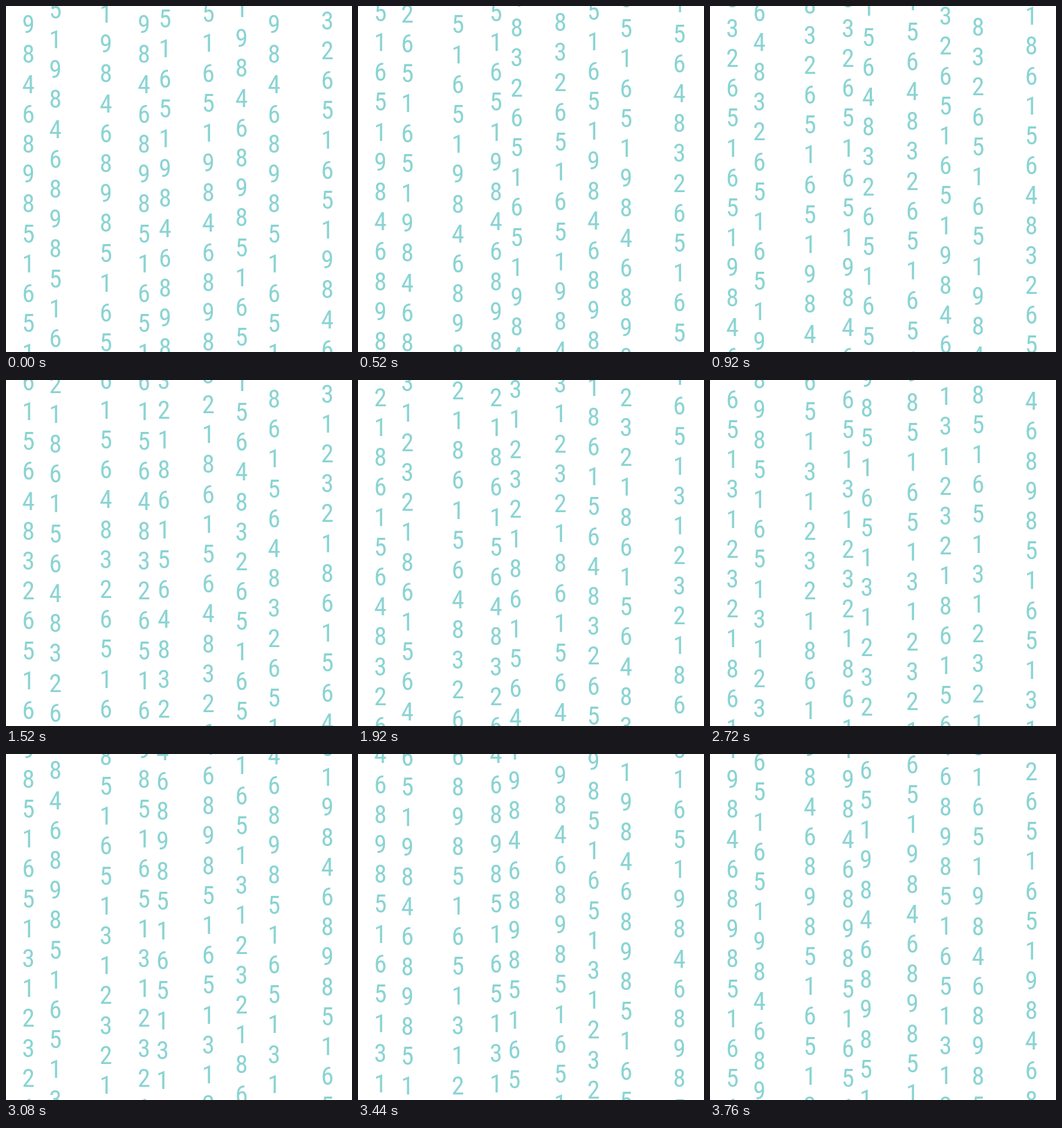
Recreate the animation shown at these times as an HTML page with a canvas. Size 500x500 px, loop 3800 ms.

```html
<!DOCTYPE html>
<html lang="en">
<head>
<meta charset="utf-8">
<title>Falling digits</title>
<style>
  html, body { margin: 0; width: 100%; height: 100%; overflow: hidden; background: #fff; }
  canvas { display: block; }
</style>
</head>
<body>
<canvas id="stage" width="500" height="500"></canvas>
<script>
const ctx = document.getElementById('stage').getContext('2d');
const SIZE = 500, LOOP = 3800, STEP = 40;
const FONT_SIZE = 37, LINE = 43.2;
const HALF_HEIGHT = FONT_SIZE * 0.356;
const DIGITS = '984689851651312321861564832651651';

// Endless strip of digits; y is the centre of the strip's first digit.
function drawStrip(x, y) {
  const first = Math.floor(-y / LINE) - 1;
  const last = Math.ceil((SIZE - y) / LINE) + 1;
  const n = DIGITS.length;
  for (let i = first; i <= last; i++) {
    const digit = DIGITS[((i % n) + n) % n];
    ctx.fillText(digit, x, y + i * LINE + HALF_HEIGHT);
  }
}

function draw(now) {
  const seconds = Math.floor((now % LOOP) / STEP) * STEP / 1000;
  const fall = (x, y, speed, drift = 0) =>
    drawStrip(x + drift * seconds, y + speed * seconds);

  ctx.fillStyle = '#fff';
  ctx.fillRect(0, 0, SIZE, SIZE);
  ctx.font = `condensed ${FONT_SIZE}px "Roboto Condensed", Roboto, sans-serif`;
  ctx.textAlign = 'center';
  ctx.fillStyle = '#8ad4d3';

  for (const x of [32.5, 199.5]) fall(x, 26, 381.8);
  fall(71.5, 91, 426.8);
  fall(144.5, 54, 362);
  fall(230, 234, 357.4, -1.2);
  fall(292.5, 226, 357.4);
  fall(340.5, 46, 341);
  fall(387.5, 26, 426.8);
  fall(464.5, 366, 368.8);
}

const start = performance.now();
function tick() {
  draw(performance.now() - start);
  requestAnimationFrame(tick);
}
tick();
</script>
</body>
</html>
```
